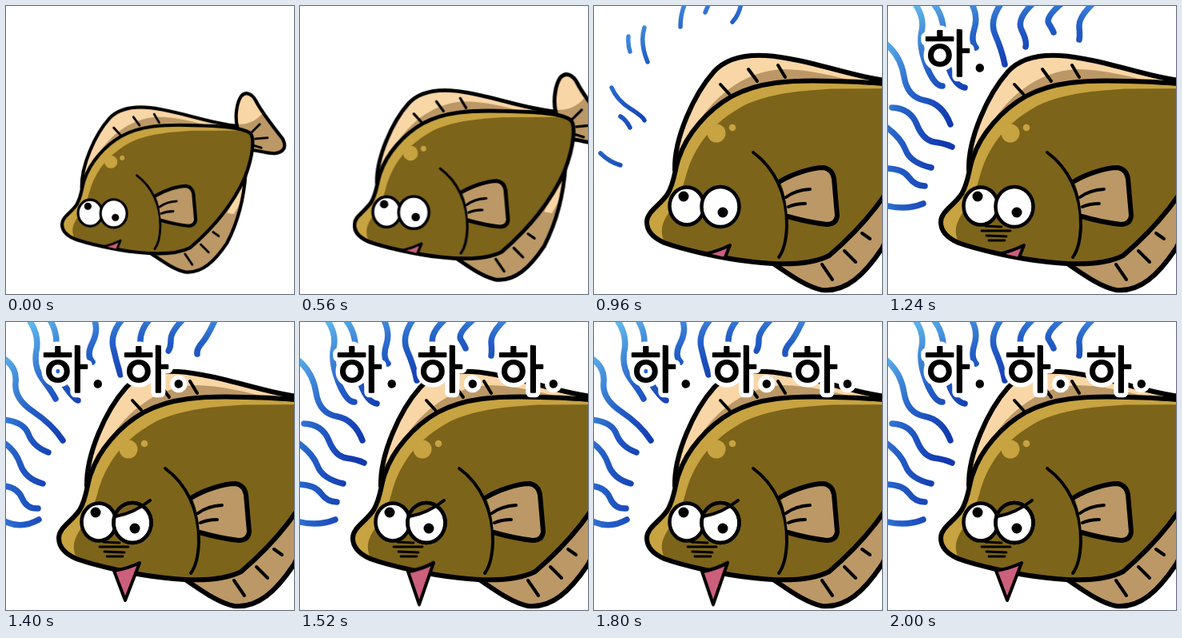
Recreate the animation shown at these times as an HTML page. Size 360 px wide and 360 px high, loop 2080 ms.

```html
<!DOCTYPE html>
<html lang="ko">
<head>
<meta charset="utf-8">
<title>Laughing flatfish</title>
<style>
html, body { margin: 0; width: 100%; height: 100%; overflow: hidden; background: #fff; }
svg { display: block; width: 100vw; height: 100vh; }
.line { fill: none; stroke: #000; stroke-width: 6; stroke-linecap: round; stroke-linejoin: round; }
.thin { stroke-width: 4; }
.wave { fill: none; stroke: url(#sea); stroke-width: 7.5; stroke-linecap: round; stroke-linejoin: round; }
.light { fill: #f9d6a6; }
.tan { fill: #bb9866; }
.gold { fill: #c7a341; }
.brown { fill: #7d641b; }
.pink { fill: #cc5f7c; }
.white { fill: #fff; }
.ball { stroke-width: 4.5; }
text {
  font: 500 63px "Noto Sans CJK KR", "Noto Sans CJK JP", "Noto Sans CJK", sans-serif;
  letter-spacing: 3px;
  stroke-linejoin: round;
}
.halo { fill: #fff; stroke: #fff; stroke-width: 13; }
.ink { fill: #000; stroke: #000; stroke-width: 2; }

/* One loop is 2080 ms; every change is a hard step. */
#fish, #streaks, #waveA, #waveB, #waveA path, #cheek, #lid, #closed, #open, .ha {
  animation: 2080ms step-end infinite;
}
#fish { animation-name: zoom; }
#streaks { stroke-width: 5.5; animation-name: streaks; }
#waveA { animation-name: waveA; }
#waveB { animation-name: waveB; }
#waveA path { stroke-dasharray: 1 2; animation-name: grow; }
#cheek, #ha1 { animation-name: at1240; }
#lid { animation-name: at1280; }
#closed { animation-name: until1280; }
#open { transform-origin: 150px 302px; animation-name: laugh; }
#ha2 { animation-name: at1400; }
#ha3 { animation-name: at1520; }

@keyframes zoom {
  0% { transform: translate(23.7px, 83.2px) scale(.702); }
  26.92% { transform: translate(14.7px, 55.6px) scale(.807); }
  28.84% { transform: translate(7.4px, 27.8px) scale(.904); }
  30.76%, 100% { transform: none; }
}
@keyframes streaks { 0% { opacity: 0; } 46.15% { opacity: 1; } 50%, 100% { opacity: 0; } }
@keyframes waveA {
  0%, 63.46%, 75%, 86.53% { opacity: 0; }
  50%, 69.23%, 80.76%, 92.3%, 100% { opacity: 1; }
}
@keyframes waveB {
  0%, 69.23%, 80.76%, 92.3%, 100% { opacity: 0; }
  63.46%, 75%, 86.53% { opacity: 1; }
}
@keyframes grow {
  0% { stroke-dashoffset: .4; }
  51.92% { stroke-dashoffset: .25; }
  53.84% { stroke-dashoffset: .12; }
  55.76%, 100% { stroke-dashoffset: 0; }
}
@keyframes at1240 { 0% { opacity: 0; } 59.61%, 100% { opacity: 1; } }
@keyframes at1280 { 0% { opacity: 0; } 61.53%, 100% { opacity: 1; } }
@keyframes until1280 { 0% { opacity: 1; } 61.53%, 100% { opacity: 0; } }
@keyframes at1400 { 0% { opacity: 0; } 67.3%, 100% { opacity: 1; } }
@keyframes at1520 { 0% { opacity: 0; } 73.07%, 100% { opacity: 1; } }
@keyframes laugh {
  0% { opacity: 0; transform: none; }
  61.53%, 67.3%, 75%, 82.69%, 90.38%, 96.15%, 100% { opacity: 1; transform: none; }
  63.46%, 71.15%, 78.84%, 86.53%, 94.23% { opacity: 1; transform: scaleY(1.11); }
}
</style>
</head>
<body>
<svg viewBox="0 0 360 360">
  <defs>
    <radialGradient id="sea" gradientUnits="userSpaceOnUse" cx="190" cy="200" r="255">
      <stop offset=".48" stop-color="#1238ae"/>
      <stop offset=".72" stop-color="#2460c8"/>
      <stop offset="1" stop-color="#62b8ec"/>
    </radialGradient>
    <path id="body" d="M66 270C66 257 82 250 92 235C101 220 101 203 106 190C116 160 142 130 172 113C205 95 245 92 300 94C345 95 385 97 400 107C410 114 406 150 391 188C372 230 343 270 294 312C270 324 235 324 200 320C160 316 110 304 88 296C72 289 66 280 66 270Z"/>
    <path id="dorsal" d="M101 205C100 165 125 110 150 82C170 60 205 58 245 66C290 74 330 90 378 95L300 130L110 200Z"/>
    <path id="anal" d="M218 318C240 332 262 350 285 355C315 358 338 336 360 303C378 268 390 225 393 178L300 300Z"/>
    <path id="tail" d="M378 97C373 75 378 52 385 42C393 33 404 37 411 50C420 68 440 94 459 118C466 132 462 142 444 144C430 144 415 138 402 138Z"/>
    <ellipse id="eye" cx="158" cy="251" rx="23.5" ry="25"/>
    <clipPath id="inBody"><use href="#body"/></clipPath>
    <clipPath id="inDorsal"><use href="#dorsal"/></clipPath>
    <clipPath id="inAnal"><use href="#anal"/></clipPath>
    <clipPath id="inTail"><use href="#tail"/></clipPath>
    <clipPath id="inEye"><use href="#eye"/></clipPath>
    <g id="ha">
      <text class="halo" x="45" y="82">하.</text>
      <text class="ink" x="45" y="82">하.</text>
    </g>
  </defs>

  <g id="streaks" class="wave">
    <path d="M22 102Q29 118 45 128T63 143M33 138Q40 142 45 152M8 184Q19 195 33 199M63 27Q57 46 67 70M43 38Q42 48 45 57M114 -4Q108 10 108 26M144 -4L139 8M184 -4Q182 10 173 20"/>
  </g>
  <g id="waveA" class="wave">
    <path pathLength="1" d="M-4 46Q16 62 20 88T46 118T78 148"/>
    <path pathLength="1" d="M5 127Q28 128 36 148T58 170T80 176"/>
    <path pathLength="1" d="M-4 150Q16 164 22 180T54 202"/>
    <path pathLength="1" d="M-4 203Q18 203 26 214T46 225"/>
    <path pathLength="1" d="M-4 249Q22 256 44 247"/>
    <path pathLength="1" d="M33 -4Q46 14 42 32T48 75T68 100"/>
    <path pathLength="1" d="M56 -4Q70 12 69 34T76 78T96 102"/>
    <path pathLength="1" d="M104 -4Q113 12 108 28T110 52"/>
    <path pathLength="1" d="M142 -4Q126 18 134 36T146 73"/>
    <path pathLength="1" d="M182 -4Q160 16 167 30T172 51"/>
    <path pathLength="1" d="M218 -4Q196 14 201 22T207 33"/>
    <path pathLength="1" d="M257 -4Q238 14 239 26T239 42"/>
  </g>
  <g id="waveB" class="wave">
    <path d="M-4 45Q14 56 12 76T34 112T71 148"/>
    <path d="M-4 122Q22 124 28 140T53 163"/>
    <path d="M-4 150Q12 160 18 178T46 202"/>
    <path d="M-4 205Q14 206 20 220T40 233"/>
    <path d="M-4 248Q18 260 41 247"/>
    <path d="M28 -4Q42 16 38 36T46 72T62 96"/>
    <path d="M54 -4Q66 14 62 36T72 78T90 98"/>
    <path d="M110 -4Q116 10 108 26T108 50"/>
    <path d="M146 -4Q130 14 134 32T143 66"/>
    <path d="M180 -4Q164 14 169 34T168 52"/>
    <path d="M222 -4Q206 12 206 22T203 36"/>
    <path d="M262 -4Q252 18 245 26T239 40"/>
  </g>

  <g id="fish">
    <use href="#tail" class="light"/>
    <path class="tan" clip-path="url(#inTail)" d="M370 90Q400 98 422 74L475 120V150H390Z"/>
    <use href="#tail" class="line"/>
    <path class="line thin" d="M403 107L418 92M410 118L432 116M408 130L421 134"/>

    <use href="#dorsal" class="light"/>
    <path class="tan" clip-path="url(#inDorsal)" d="M122 160C145 116 185 82 235 79C270 79 300 88 330 95L300 110L120 180Z"/>
    <use href="#dorsal" class="line"/>
    <path class="line thin" d="M158 98L169 110M193 79L204 94M230 74L239 89"/>

    <use href="#anal" class="tan"/>
    <path class="light" clip-path="url(#inAnal)" d="M400 165L360 250L372 252L402 200Z"/>
    <use href="#anal" class="line"/>

    <use href="#body" class="gold"/>
    <path class="brown" clip-path="url(#inBody)" d="M92 302C78 280 86 268 102 246C114 225 114 208 123 190C136 163 155 142 188 124C222 108 262 106 296 103.5L400 103L420 110V340H92Z"/>
    <circle class="gold" cx="153" cy="159" r="11.5"/>
    <circle class="gold" cx="173" cy="152" r="4.3"/>
    <use href="#body" class="line"/>
    <path class="line thin" d="M285 323L298 342M313 306L327 320M335 284L345 291"/>

    <path class="line thin" d="M199 183C225 202 242 235 241 275Q240 302 231 314"/>
    <path class="tan" d="M233 219C248 210 272 202 287 202Q298 204 300 216L304 262Q303 273 291 273C272 271 256 267 242 263Q240 238 233 219Z"/>
    <path class="line" d="M233 219C248 210 272 202 287 202Q298 204 300 216L304 262Q303 273 291 273C272 271 256 267 242 263"/>
    <path class="line thin" d="M240 239Q252 230 270 229M243 251Q252 247 264 247"/>

    <g class="line ball">
      <ellipse class="white" cx="116" cy="250" rx="21.5" ry="23.5"/>
      <use href="#eye" class="white"/>
    </g>
    <circle cx="112" cy="238" r="6.5"/>
    <circle cx="161" cy="258" r="6.5"/>

    <g id="lid">
      <path class="brown" clip-path="url(#inEye)" d="M128 220H186L181 223Q158 240 132 245Z"/>
      <use href="#eye" class="line ball"/>
      <path class="line thin" d="M137 243Q160 239 180 223"/>
    </g>
    <path id="cheek" class="line" style="stroke-width:2.8" d="M122 275L142 276M117 281L153 281M123 287L148 288M126 293L146 293"/>

    <g id="closed">
      <path class="pink" d="M143 309L170 299L164 314Z"/>
      <path class="line thin" d="M139 310Q156 306 170 299L164 314"/>
    </g>
    <g id="open" class="line thin">
      <path class="pink" d="M135 311Q153 308 167 301L149 348Z"/>
    </g>
  </g>

  <use id="ha1" class="ha" href="#ha"/>
  <use id="ha2" class="ha" href="#ha" x="101"/>
  <use id="ha3" class="ha" href="#ha" x="202"/>
</svg>
</body>
</html>
```
